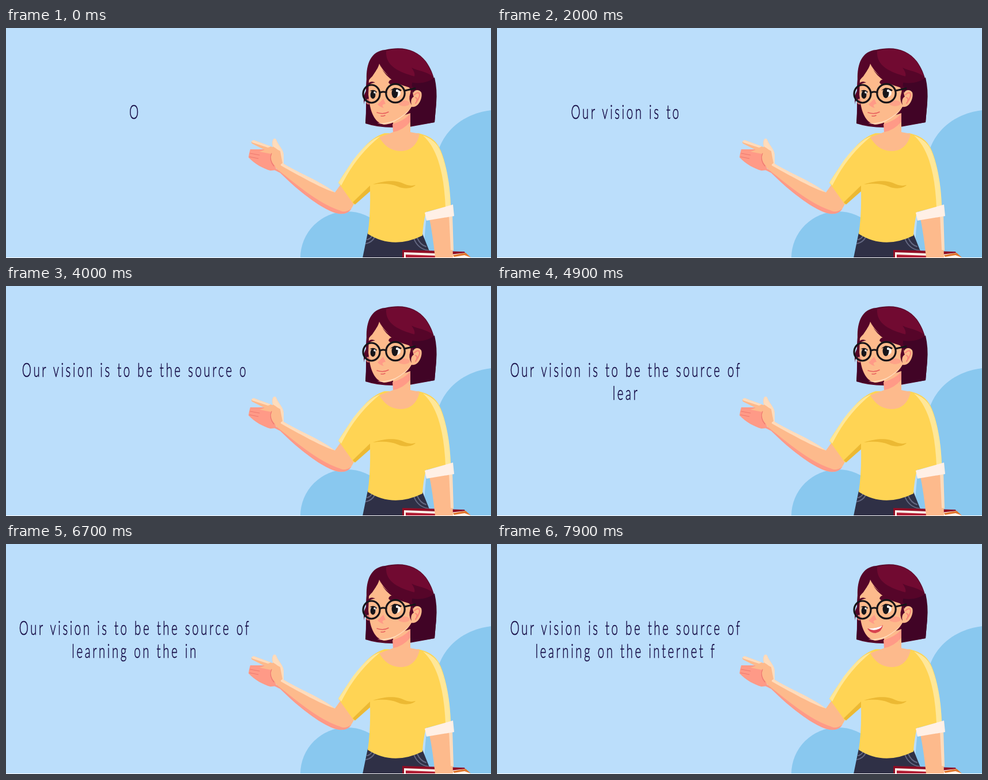
Animation of 842 by 400 pixels, one loop 8000 ms. Source, as an HTML page:

```html
<!DOCTYPE html>
<html lang="en">
<head>
<meta charset="utf-8">
<title>Our vision</title>
<style>
  html, body { margin: 0; width: 100%; height: 100%; overflow: hidden; background: #fff; }
  svg { display: block; width: 842px; height: 399px; overflow: hidden; }
  #lines {
    font: 300 33px Lato, "Open Sans", sans-serif;
    letter-spacing: 5.8px;
    word-spacing: .5px;
    text-anchor: middle;
    fill: #150b45;
    stroke: #150b45;
    stroke-width: .6px;
  }
  .skin { fill: #fdba8c; }
  .glow { fill: #ffdcbc; }
  .blush { fill: #ff9a87; }
  .hair { fill: #560529; }
  .deep { fill: #410426; }
  .shirt { fill: #ffd454; }
  .shine { fill: #ffe798; }
  .fold { fill: #ecb933; }
  .pants { fill: #2f3046; }
  .ink { fill: #171519; }
  .line { fill: none; stroke-linecap: round; stroke-linejoin: round; }
</style>
</head>
<body>
<svg viewBox="0 0 842 399">
  <rect width="842" height="400" fill="#bbdefb"/>
  <g fill="#89c8ef">
    <path d="M860 142C804 142 763 172 750 215C740 260 727 320 725 400H860Z"/>
    <circle cx="592" cy="400" r="81"/>
  </g>

  <!-- one narrow face for both lines -->
  <g id="lines" transform="translate(224 0) scale(.62 1)">
    <text y="158"></text>
    <text y="198"></text>
  </g>

  <g id="body">
    <path class="pants" d="M628 356L619 400H735V388L723 358Z"/>
    <g class="line" stroke="#646882" stroke-width="2">
      <path d="M640 364Q635 373 625 375M635 362Q632 367 627 368"/>
      <path d="M708 366Q715 384 733 387M714 365Q719 377 729 380"/>
    </g>

    <g id="books">
      <path fill="#8f0d25" d="M688 386L796 389L801 400H688Z"/>
      <path fill="#fff3e9" d="M691 390L748 392V400H691Z"/>
      <path fill="#b01c33" d="M694 394L748 396V400H694Z"/>
      <path fill="#fff3e9" d="M772 394L797 391L808 400H772Z"/>
      <path fill="#e0752b" d="M776 395L798 391L807 399L796 395L778 398Z"/>
    </g>

    <path class="skin" d="M735 331L774 323L776 400H745Q741 360 735 331Z"/>
    <path class="glow" d="M769 325L775 324L777 387L772 386Z"/>

    <path class="skin" d="M581 272L605 303C600 317 593 323 580 323C558 321 522 290 474 249L463 238L463 206C461 196 464 190 469 194C473 205 482 211 482 222L482 236C510 254 545 266 571 286Z"/>
    <path class="blush" d="M470 245C502 270 540 305 584 319Q593 320 600 314Q593 325 578 323C555 320 512 288 476 252L466 247Z"/>
    <path class="glow" d="M463 206C461 195 465 189 469 194C473 205 482 211 482 221V236C510 253 545 266 571 286C550 280 514 260 477 239C479 222 476 212 463 206Z"/>
    <path class="blush" d="M447 211L424 211L422 219L421 225C432 237 448 245 459 248L470 247C464 236 463 224 460 213Z"/>
    <path class="skin" d="M465 208L430 195Q424 197 427 201L449 212L440 215L460 219Q459 235 470 242L480 235L476 214Z"/>
    <path class="glow" d="M460 206L430 195Q425 196 427 199L455 208Z"/>
    <g class="line" stroke="#ed796f" stroke-width="1.2">
      <path d="M461 218Q456 229 465 240M424 218L440 221M423 224L438 227"/>
    </g>

    <path class="shirt" d="M657 183C633 191 622 207 608 224Q590 247 577 269L604 307L632 284Q633 324 628 358Q672 386 723 361Q724 342 729 320L772 309C770 270 763 224 750 204Q740 188 716 183Z"/>
    <path class="shine" d="M650 188C630 195 615 214 601 232L577 269L582 274C598 243 617 215 650 188Z"/>
    <path class="shine" d="M724 187Q746 195 754 213C766 242 771 276 772 309L763 312C761 268 754 214 724 187Z"/>
    <path class="fold" d="M632 274L602 303L606 307L632 284Z"/>
    <path class="fold" d="M637 272C660 264 680 265 691 271Q701 276 711 273C705 280 690 280 681 276C667 270 653 270 637 272Z"/>
    <path fill="#fff0e6" d="M727 321L776 307L778 327L730 335Z"/>
  </g>

  <g id="head">
    <path class="hair" d="M624 166C626 140 624 115 626 90C625 62 634 40 658 38C690 31 713 38 729 58C745 80 748 105 747 130L744 164C720 168 690 176 672 173Q644 173 624 166Z"/>
    <path class="deep" d="M705 95C722 98 738 92 744 86Q749 108 747 130L744 164L700 171Z"/>
    <path class="deep" d="M627 116L633 145Q641 160 648 170L624 166Z"/>
    <path fill="#710a31" d="M660 40C688 32 714 39 728 58Q737 72 741 84C726 74 716 75 704 69Q711 78 709 84C684 77 658 67 660 40Z"/>

    <path class="skin" d="M672 158L702 148V181L718 184C714 205 700 215 683 214C667 213 656 204 648 190L672 181Z"/>
    <path class="blush" d="M671 167Q690 162 702 149V163Q689 178 672 181Z"/>

    <path class="skin" d="M648 62C645 77 628 86 627 101L631 130C634 150 642 165 656 168C676 167 695 153 704 137C716 140 724 121 721 112C717 106 709 107 707 113L704 104C683 99 660 85 648 62Z"/>
    <path class="glow" d="M645 165Q655 170 674 163Q695 152 704 136Q695 150 676 160Q659 167 645 165Z"/>
    <path class="line" stroke="#f98479" stroke-width="2" d="M709 116Q718 108 718 118Q716 125 711 131M711 121Q715 122 713 127"/>
    <path class="hair" d="M648 62Q655 83 687 94L707 103Q705 115 708 119Q701 124 704 134Q698 125 702 113Q704 106 699 103Q660 93 648 62Z"/>
    <path class="hair" d="M647 58Q644 78 630 90L629 118Q621 125 622 133Q619 120 625 109L626 86Z"/>

    <g class="blush" opacity=".75">
      <ellipse cx="691" cy="131" rx="10" ry="5"/>
      <ellipse cx="629" cy="128" rx="4" ry="5"/>
    </g>
    <g class="hair">
      <path d="M626 100Q632 90 641 95Q633 95 628 102Z"/>
      <path d="M664 95Q666 88 675 90L690 98Q677 96 667 98Z"/>
    </g>
    <g fill="#fff5ee">
      <ellipse cx="637" cy="115" rx="5" ry="6"/>
      <ellipse cx="678" cy="113" rx="7" ry="7"/>
    </g>
    <g class="ink">
      <path d="M631 110Q638 105 644 111L642 113Q637 109 631 110Z"/>
      <path d="M667 109Q675 100 687 108L685 110Q676 104 667 109Z"/>
      <ellipse cx="637" cy="116" rx="4.5" ry="7"/>
      <ellipse cx="675" cy="113" rx="5.5" ry="9"/>
    </g>
    <g fill="#fff">
      <circle cx="640" cy="112" r="1.8"/>
      <circle cx="679" cy="109" r="2.2"/>
    </g>
    <g class="line" stroke="#171519" stroke-width="3.2">
      <ellipse cx="634.5" cy="114.5" rx="14.5" ry="15.5"/>
      <circle cx="676" cy="113.5" r="16.2"/>
      <path d="M650 112Q655 110 660 112M692 109L710 105"/>
    </g>
    <path class="blush" d="M655 123L645 133Q650 138 656 139Q650 133 659 132Z"/>

    <path id="closed" class="line" stroke="#e75f5d" stroke-width="1.5" d="M644 147Q655 151 664 146M651 153Q654 154 658 152"/>
    <g id="open">
      <path fill="#d8434f" d="M643 147Q658 148 670 141Q668 153 657 155Q648 155 643 147Z"/>
      <path fill="#fff" d="M645 147Q658 147 669 142Q667 147 659 149Q651 151 645 147Z"/>
    </g>
  </g>
</svg>
<script>
  const LOOP = 8000;
  const COPY = ["Our vision is to be the source of", "learning on the internet for"];
  const OPEN_MOUTH_STEP = 46;
  const rows = document.querySelectorAll("#lines text");
  const mouth = {
    open: document.getElementById("open"),
    closed: document.getElementById("closed")
  };
  const start = performance.now();
  let shown = -1;

  // Returns the part of a line that holds its first `count` letters; spaces are free.
  function typed(line, count) {
    let end = 0;
    for (let i = 0; i < line.length && count > 0; i++) {
      if (line[i] === " ") continue;
      count--;
      end = i + 1;
    }
    return line.slice(0, end);
  }

  const letters = line => line.replaceAll(" ", "").length;

  function show(step) {
    let count = step + 1;
    COPY.forEach((line, i) => {
      rows[i].textContent = typed(line, count);
      count -= letters(line);
    });
    const talking = step >= OPEN_MOUTH_STEP;
    mouth.open.style.display = talking ? "" : "none";
    mouth.closed.style.display = talking ? "none" : "";
  }

  // Six letters a second, on a 100 ms clock.
  function tick() {
    const time = (performance.now() - start) % LOOP;
    const step = Math.floor(Math.floor(time / 100) * 6 / 10);
    if (step !== shown) show(shown = step);
    requestAnimationFrame(tick);
  }
  tick();
</script>
</body>
</html>
```
